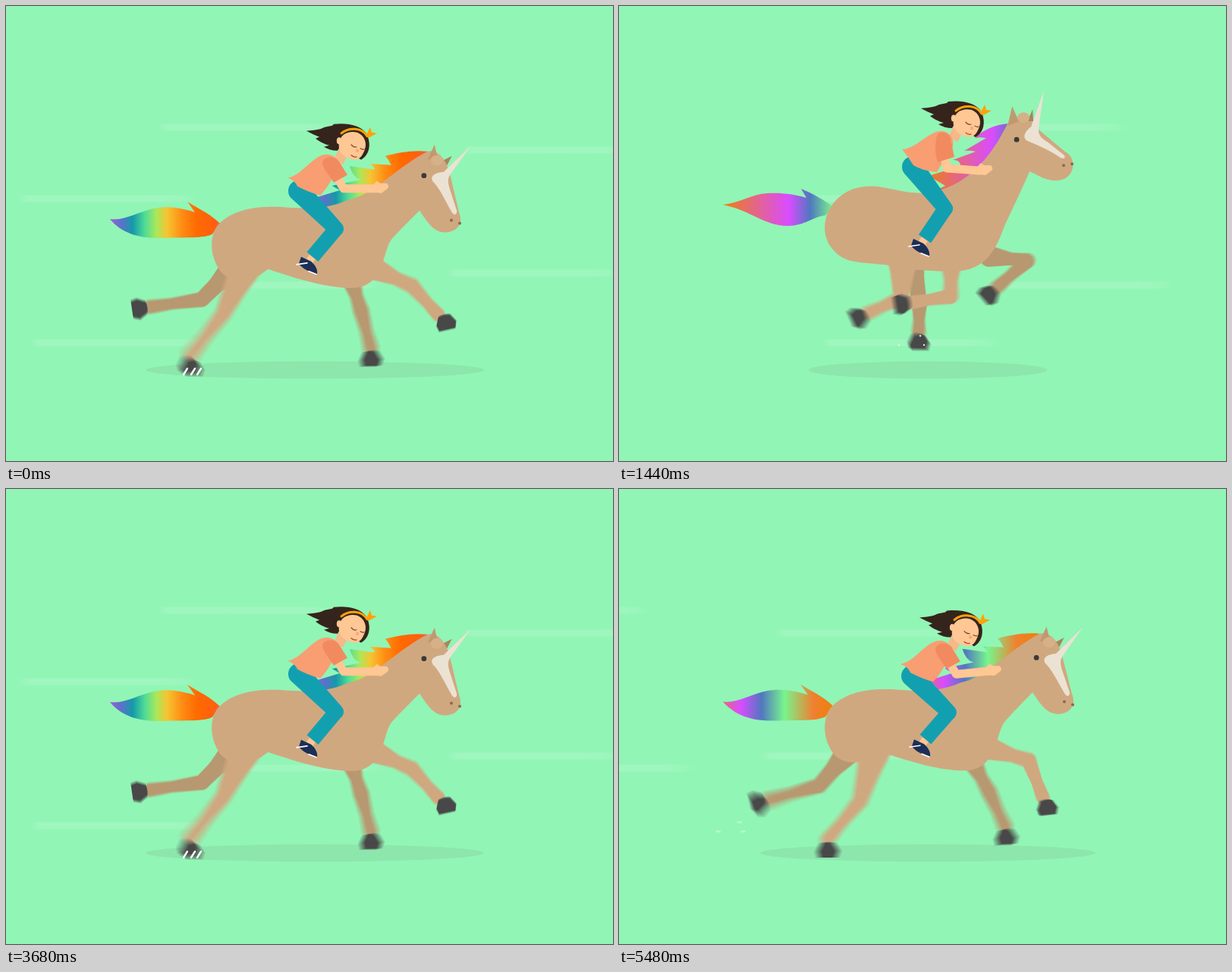
An HTML page with a canvas that plays this animation: 800 by 600 pixels, repeating every 5520 ms.

```html
<!DOCTYPE html>
<html lang="en">
<head>
<meta charset="utf-8">
<title>Unicorn ride</title>
<style>
  html, body { margin: 0; width: 100%; height: 100%; overflow: hidden; background: #91f5b5; }
  canvas { display: block; width: 800px; height: 600px; }
</style>
</head>
<body>
<canvas id="stage" width="800" height="600"></canvas>
<script>
const STRIDE = 920, STEP = 40, LOOP = 5520;
// Channels are multiples of 8, so averaging eight shots keeps them exact.
const COAT = '#d0a880', COAT_FAR = '#b89870', HOOF = '#484848';
const SKIN = '#ffc793', PANTS = '#12a0b0', BAND = '#ffa10a';
const ctx = document.getElementById('stage').getContext('2d');

const layer = () => {
  const c = document.createElement('canvas');
  c.width = 800; c.height = 600;
  return c.getContext('2d');
};
const scratch = layer(), blurred = layer();

const lerp = (a, b, k) => a + (b - a) * k;
const clamp = v => Math.max(0, Math.min(1, v));
const mod = (a, n) => ((a % n) + n) % n;
const NUM = /-?[\d.]+/g;

// Blends two path strings that share one structure.
function blend([a, b], k) {
  const end = b.match(NUM);
  let i = 0;
  return new Path2D(a.replace(NUM, v => lerp(+v, +end[i++], k).toFixed(2)));
}

// Periodic smooth curve through rows of [time, ...values].
function sample(keys, time) {
  const n = keys.length, t = mod(time, STRIDE);
  const row = i => keys[mod(i, n)];
  const at = i => row(i)[0] + STRIDE * Math.floor(i / n);
  let i = n - 1;
  while (keys[i][0] > t) i--;
  const span = at(i + 1) - at(i), u = (t - at(i)) / span;
  return row(i).slice(1).map((p, j) => {
    const val = m => row(m)[j + 1];
    const slope = m => (val(m + 1) - val(m - 1)) / (at(m + 1) - at(m - 1)) * span;
    const q = val(i + 1), u2 = u * u, u3 = u2 * u;
    return p * (2 * u3 - 3 * u2 + 1) + q * (3 * u2 - 2 * u3)
      + slope(i) * (u3 - 2 * u2 + u) + slope(i + 1) * (u3 - u2);
  });
}

// Low and high poses of the gallop.
const BODY = [
  'M280 288 C300 268 330 264 360 265 C395 268 425 268 450 256 C485 250 515 212 556 192 C570 188 582 205 586 225 L597 272 C604 290 592 299 578 299 C562 298 555 284 545 270 C535 280 512 303 508 308 C496 322 500 372 455 372 C425 372 390 362 345 347 C325 365 288 370 276 338 C270 325 268 302 280 288Z',
  'M281 262 C297 240 320 236 340 238 C370 242 385 250 415 245 C460 235 490 200 512 155 C522 147 548 148 552 162 L588 192 C604 200 602 228 578 230 C560 230 552 222 541 218 C534 235 515 275 508 290 C498 318 485 350 440 350 C420 350 390 348 370 345 C330 335 300 345 281 320 C268 305 268 280 281 262Z'];
const MANE = [
  'M556 192 C535 190 515 194 500 198 C505 203 505 206 508 210 L480 208 C485 212 486 214 486 216 L453 211 C456 222 462 228 468 229 L430 237 L440 243 L407 253 C418 260 422 264 415 267 C445 268 470 262 492 246 C520 228 540 206 556 192Z',
  'M513 155 C497 156 480 163 469 174 C478 172 482 174 484 174 L455 191 C462 190 468 191 470 192 L440 203 C448 203 450 207 450 211 L408 224 L430 237 L416 244 C424 245 432 246 415 247 C440 246 460 232 480 205 C495 190 505 170 513 155Z'];
const TAIL = [
  'M137 281 C155 284 172 272 195 267 C215 263 232 267 249 272 L239 258 C255 268 272 276 282 287 L272 301 C262 307 235 305 208 306 C175 307 153 300 137 281Z',
  'M137 262 C158 260 175 248 195 247 C215 246 230 248 247 253 L240 241 C255 247 270 256 282 264 L272 276 C255 278 245 290 222 290 C192 290 175 270 137 262Z'];
const HORN = [
  'M613 185 L577 219 C566 220 558 224 563 232 C570 238 578 255 588 273 C592 278 595 274 594 270 L586 245 C582 232 582 228 586 222Z',
  'M560 111 L543 159 C536 164 531 172 537 177 C548 182 565 188 582 200 C588 202 589 199 586 196 L566 180 C556 174 552 170 553 160Z'];
const EAR = ['M556 203 L565 183 L569 200Z', 'M512 158 L518 132 L527 152Z'];
const EAR_FAR = ['M570 207 L588 198 L577 219Z', 'M538 152 L545 136 L546 152Z'];
const SHIRT = [
  'M371 227 C388 224 398 206 414 198 C426 192 440 199 438 213 C430 226 426 238 414 250 C400 246 392 242 384 238 C382 233 378 229 371 227Z',
  'M373 189 C390 188 402 172 418 166 C430 162 443 170 440 186 C430 198 426 208 419 219 C405 218 395 214 388 210 C384 204 379 196 373 189Z'];
const SLEEVE = [
  'M417 206 C421 196 436 198 440 207 L450 223 L432 233 C425 222 417 214 417 206Z',
  'M418 176 C418 165 431 164 436 172 L442 199 L420 206 C416 195 417 184 418 176Z'];

// Rows: time, joint x, joint y, hoof x, hoof y (far side).
const HIND = [
  [0, 258, 387, 175, 399], [60, 263, 377, 174, 380], [160, 280, 370, 192, 368],
  [300, 325, 372, 240, 385], [420, 372, 385, 315, 411], [520, 396, 393, 395, 444],
  [620, 386, 410, 400, 477], [700, 358, 413, 340, 478], [780, 318, 411, 275, 477],
  [820, 286, 406, 243, 477], [880, 264, 391, 183, 414]];
const FRONT = [
  [0, 468, 402, 481, 466], [60, 445, 405, 440, 475], [160, 412, 396, 365, 468],
  [250, 407, 387, 338, 436], [360, 437, 383, 372, 393], [520, 538, 336, 487, 381],
  [640, 548, 342, 545, 402], [720, 540, 358, 564, 421], [760, 535, 369, 580, 418],
  [820, 518, 387, 556, 444], [880, 488, 400, 510, 460]];
// Extra bounce of the rider on top of the gallop.
const BOUNCE = [[0, 0], [80, -5], [300, 0], [520, 0], [700, -2], [800, 4], [860, 8]];

// Colours along the hair, in a strip that slides to the left.
const HAIR = [
  [137, '#a05ce0'], [152, '#5a72c8'], [167, '#149aa8'], [183, '#4fdc96'], [198, '#a8e85c'],
  [212, '#f5c532'], [232, '#ff8c14'], [252, '#ff6a00'], [275, '#ff6010']];
for (const x of [371, 577, 738]) HAIR.push(
  [x - 28, '#d94cff'], [x, '#5078c0'], [x + 30, '#78f58c'], [x + 68, '#f08030'], [x + 90, '#ef7f10']);

// Speed lines: [left, y].
const LINES = [[198, 160], [600, 190], [15, 254], [580, 352], [260, 368], [30, 444]];
const LINE_W = 240, LINE_GAP = 1145;

function lift(t) {
  const h = .5 + .5 * Math.cos((t - 495) / STRIDE * 2 * Math.PI);
  return lerp(h, h * h * (3 - 2 * h), .6);
}

function fill(path, color, c = ctx) {
  c.fillStyle = color;
  c.fill(path);
}

function oval(x, y, rx, ry, color) {
  ctx.fillStyle = color;
  ctx.beginPath();
  ctx.ellipse(x, y, rx, ry, 0, 0, 7);
  ctx.fill();
}

function stroke(path, color, width, cap = 'round') {
  ctx.strokeStyle = color;
  ctx.lineWidth = width;
  ctx.lineCap = cap;
  ctx.lineJoin = 'round';
  ctx.stroke(new Path2D(path));
}

// Tapered limb between two circles.
function limb(c, x1, y1, r1, x2, y2, r2) {
  const a = Math.atan2(y2 - y1, x2 - x1), q = Math.PI / 2;
  c.beginPath();
  c.arc(x1, y1, r1, a + q, a - q);
  c.arc(x2, y2, r2, a - q, a + q);
  c.fill();
}

// Limb with a slim middle.
function bone(c, x1, y1, r1, x2, y2, r2, slim) {
  const x = lerp(x1, x2, .58), y = lerp(y1, y2, .58);
  limb(c, x1, y1, r1, x, y, slim);
  limb(c, x, y, slim, x2, y2, r2);
}

function leg(c, track, t, root, radius, color) {
  const [jx, jy, hx, hy] = sample(track, t);
  const ground = clamp((hy - 430) / 40);
  const dir = lerp(Math.atan2(hy - jy, hx - jx), Math.PI / 2, ground);
  const fx = hx - 15 * Math.cos(dir), fy = hy - 15 * Math.sin(dir);
  const [rx, ry] = root(jx, lift(t));
  const tilt = dir - Math.PI / 2;
  c.fillStyle = color;
  bone(c, rx, ry, radius, jx, jy, 10, radius * .6);
  bone(c, jx, jy, 10, fx, fy, 9, 7.5);
  c.save();
  c.translate(hx, hy);
  c.rotate(tilt < 0 ? tilt * .3 : tilt);
  fill(new Path2D('M-8 -10 C-3 -12 4 -12 8 -10 L14 0 L11 9 L-11 9 L-13 1Z'), HOOF, c);
  c.restore();
}

const hip = (dx, dy) => (x, h) => [322 + dx + (x - 284) * .6, lerp(330 + dy, 314, h)];
const elbow = (x, h) => [438 + (x - 437) / 2, lerp(356, 330, h)];

// A pair of legs, averaged over a short shutter time.
function legs(t, far) {
  const shots = 8, shutter = 15;
  blurred.clearRect(0, 0, 800, 600);
  blurred.globalCompositeOperation = 'lighter';
  blurred.globalAlpha = 1 / shots;
  for (let i = 0; i < shots; i++) {
    const s = t + ((i + .5) / shots - .5) * shutter;
    scratch.clearRect(0, 0, 800, 600);
    if (far) {
      leg(scratch, HIND, s, hip(-4, 13), 18, COAT_FAR);
      leg(scratch, FRONT, s, elbow, 14, COAT_FAR);
    } else {
      leg(scratch, HIND, s - 100, hip(0, 0), 25, COAT);
      leg(scratch, FRONT, s - 160, elbow, 15, COAT);
    }
    blurred.drawImage(scratch.canvas, 0, 0);
  }
  blurred.globalAlpha = 1;
  blurred.globalCompositeOperation = 'source-over';
  ctx.drawImage(blurred.canvas, 0, 0);
}

function rainbow(t, dx) {
  const from = 100, to = 900, shift = dx - t * .625;
  const g = ctx.createLinearGradient(from + shift, 0, to + shift, 0);
  for (const [x, color] of HAIR) g.addColorStop((x - from) / (to - from), color);
  return g;
}

function speedLines(t) {
  for (const [left, y] of LINES) for (const lap of [0, LINE_GAP]) {
    const x = left + lap - t * 1.75;
    if (x > 800 || x + LINE_W < 0) continue;
    const g = ctx.createLinearGradient(x, 0, x + LINE_W, 0);
    [0, .13, .13, .09, 0].forEach((a, i) =>
      g.addColorStop([0, .06, .78, .9, 1][i], `rgba(255,255,255,${a})`));
    ctx.fillStyle = g;
    ctx.fillRect(x, y - 4.5, LINE_W, 9);
  }
}

function dust(t) {
  if (t >= 500) {
    const age = clamp((t - 520) / 360), color = `rgba(225,255,236,${lerp(.9, .5, age)})`;
    for (const [x, y] of [[369, 447], [397, 435], [402, 447]])
      oval(x - (t - 520) * .662, y + 4.5 * age, lerp(1.2, 3.5, age), 1.3, color);
  }
  if (t < 160) {
    const x = -t * .66, len = 1 - t / 160;
    for (const p of [234, 244, 252])
      stroke(`M${p + x} 486 l${5 * len} ${-8 * len}`, `rgba(255,255,255,${len})`, 2.4);
  }
}

function rider(h, g) {
  const x = (a, b) => lerp(a, b, h), y = (a, b, part = 0) => lerp(a, b, h) + g * part;
  const hx = x(386, 387), hy = y(244, 212, .6), kx = x(435, 430), ky = y(294, 267, .25);
  const ax = x(404, 403), ay = y(331, 307);

  stroke(`M${ax} ${ay} l-5 7`, SKIN, 10, 'butt');
  ctx.fillStyle = PANTS;
  limb(ctx, hx, hy, 14, kx, ky, 10);
  stroke(`M${lerp(hx, kx, .5)} ${lerp(hy, ky, .5)} L${kx} ${ky} L${ax} ${ay}`, PANTS, 19.5, 'butt');
  ctx.save();
  ctx.translate(ax - 404, ay - 331);
  fill(new Path2D('M389 331 L402 337 C408 342 411 348 410 354 C400 351 391 347 386 340Z'), '#1c2f57');
  stroke('M383 341 L397 339 M399 350 L409 354', '#fff', 1.6);
  ctx.restore();

  // Head
  ctx.save();
  ctx.translate(x(0, 2), y(0, -30, .9));
  stroke('M446 190 L438 206', '#f5b888', 14, 'butt');
  fill(new Path2D('M396 165 C408 164 414 163 420 160 L430 158 L432 156 C452 154 466 158 474 167 C482 180 480 196 468 203 L440 186 L437 191 C430 191 424 189 419 186 L426 184 C418 182 412 178 408 175 L413 173 C408 171 402 168 396 165Z'), '#35241b');
  fill(new Path2D('M439 180 C441 169 452 164 463 167 C472 171 476 180 473 189 C470 198 465 204 458 203 C445 200 437 194 439 180Z'), SKIN);
  oval(439, 178, 3.2, 4.5, SKIN);
  stroke('M442 168 C452 160 469 160 476 172', BAND, 3);
  fill(new Path2D('M474 172 L480 160 L482 167 L489 168 L478 174Z'), BAND);
  stroke('M455 183 q3 4 7 3 M467 188 q3 2 5 1', '#6b4030', 1.1);
  oval(463, 191, 2, 2.4, '#f9a57c');
  stroke('M455 197 q3 3 7 2', '#a8472f', 1.3);
  ctx.restore();

  // Torso and arm
  ctx.save();
  ctx.translate(0, g * .85);
  fill(blend(SHIRT, h), '#f99d73');
  ctx.restore();
  const wx = x(486, 474), wy = y(241, 217);
  stroke(`M${x(438, 430)} ${y(229, 203, .8)} L${x(445, 432)} ${y(241, 214, .7)} L${wx} ${wy}`, SKIN, 11);
  fill(new Path2D(`M${wx - 2} ${wy - 5} l5 -5 l4 3 l9 0 q4 4 1 7 l-8 6 l-12 -1Z`), SKIN);
  ctx.save();
  ctx.translate(0, g * .85);
  fill(blend(SLEEVE, h), '#f28a60');
  ctx.restore();
}

function draw(time) {
  const t = mod(time, STRIDE), h = lift(t), [g] = sample(BOUNCE, t);
  const spot = (ax, ay, bx, by, rx, ry, color) => oval(lerp(ax, bx, h), lerp(ay, by, h), rx, ry, color);

  ctx.fillStyle = '#91f5b5';
  ctx.fillRect(0, 0, 800, 600);
  oval(407, 480, lerp(223, 157, h), 11.5, '#8de6ac');
  speedLines(t);

  legs(t, true);
  fill(blend(TAIL, h), rainbow(t, 0));
  fill(blend(MANE, h), rainbow(t, 268));
  fill(blend(EAR_FAR, h), '#a98560');
  legs(t, false);
  fill(blend(BODY, h), COAT);
  dust(t);

  fill(blend(EAR, h), '#bf9a70');
  spot(568, 204, 533, 147, 8, 7, '#d6b188');
  fill(blend(HORN, h), '#ebe2d3');
  spot(551, 224, 524, 176, 3.4, 3.4, '#3a3a3a');
  spot(587, 283, 586, 210, 2, 2, '#8a6a50');
  spot(598, 287, 597, 208, 2, 2, '#8a6a50');
  rider(h, g);
}

const start = performance.now();
let shown = -1;
function tick() {
  const step = Math.floor(mod(performance.now() - start, LOOP) / STEP);
  if (step !== shown) draw(step * STEP);
  shown = step;
  requestAnimationFrame(tick);
}
tick();
</script>
</body>
</html>
```
